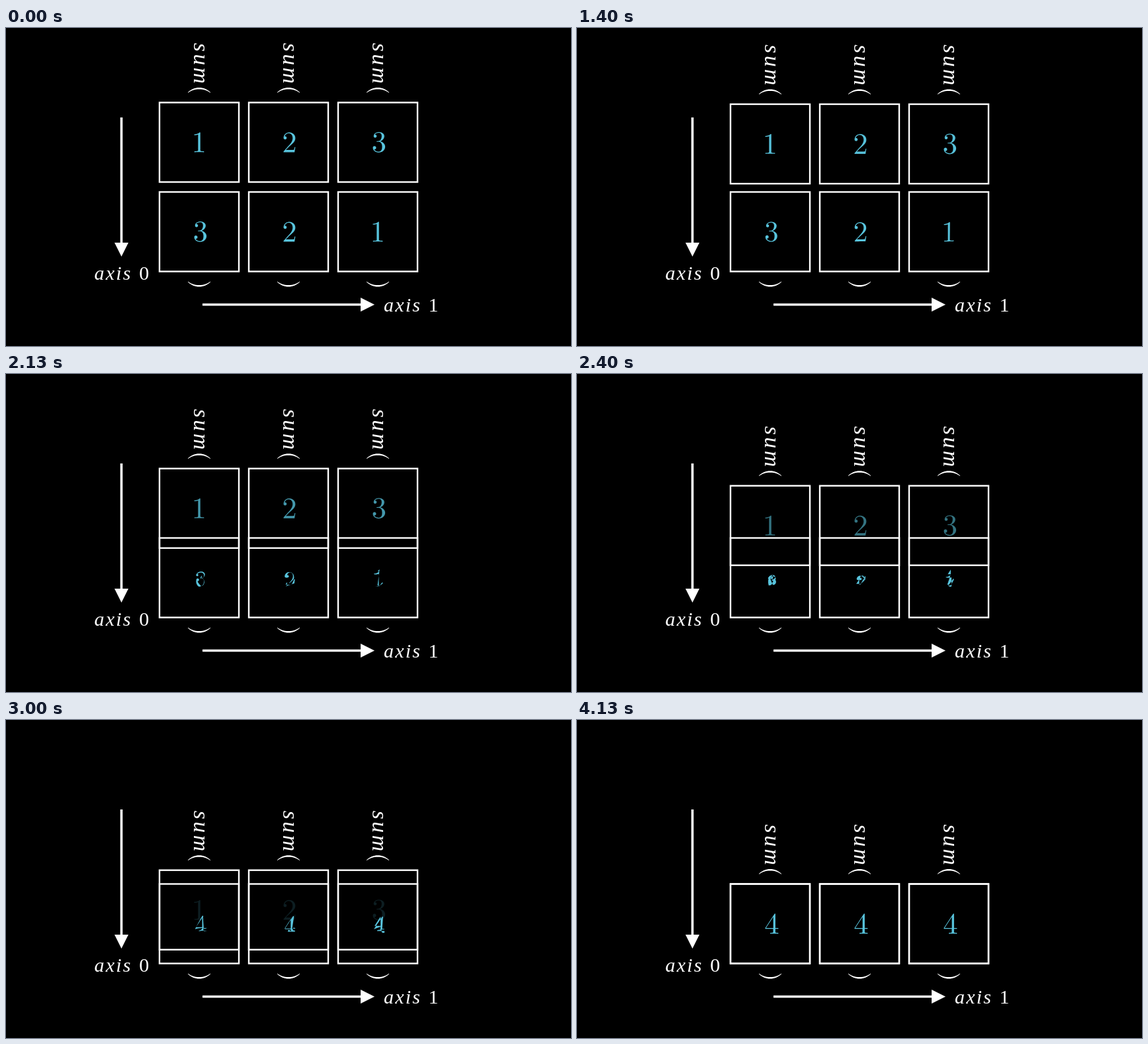
An HTML page for the animation above (4.99 s loop, 854 by 480 pixels).

```html
<!DOCTYPE html>
<html lang="en">
<head>
<meta charset="utf-8">
<title>Sum along axis 0</title>
<style>
  html, body { margin: 0; height: 100%; overflow: hidden; background: #000; }
  svg { display: block; width: 100%; height: 100%; }
  text { fill: #fff; font-family: "Liberation Serif", "Times New Roman", serif; }
  .word { font-style: italic; }
  .axis { font-size: 30px; }
  .axis.word { letter-spacing: 2.2px; }
  .sum { font-size: 34px; letter-spacing: 3.4px; }
  .box { fill: none; stroke: #fff; stroke-width: 2.4; }
  .digit { fill: #58c4dd; }
  .white { fill: #fff; }
  .shaft { stroke: #fff; stroke-width: 3.6; }
</style>
</head>
<body>
<svg viewBox="0 0 854 480" role="img" aria-label="A 2 by 3 array summed along axis 0">
  <defs>
    <path id="paren" d="M-16.9 7C-12 2.2-6.5 0 0 0S12 2.2 16.9 7V8C13 4.5 7 2.5 0 2.5S-13 4.5-16.9 8Z"/>
  </defs>
  <g id="bottom"></g>
  <g id="top"></g>

  <path class="shaft" d="M174.5 135V325M297 417.5H537"/>
  <path class="white" d="M164 324H185L174.5 345ZM536 407V428L557 417.5Z"/>
  <text class="axis word" x="133.5" y="380.3">axis</text>
  <text class="axis" x="208.7" y="380.3" text-anchor="middle">0</text>
  <text class="axis word" x="571" y="428">axis</text>
  <text class="axis" x="646" y="428" text-anchor="middle">1</text>
</svg>

<script>
const LOOP = 4990, FPS = 15, START = 1, DURATION = 3;   // ms, 1/s, s, s
const PITCH = 135, ROW_Y = 172.5, DIGIT_X = 284.5, DIGIT_SCALE = 0.045;
const STEPS = 6;                                        // samples per curve

// Digit outlines, 996 units per em, y downwards.
const DIGITS = {
  1: `M294-638C294-662 294-664 270-664C208-600 120-600 89-600L89-569
      C109-569 167-569 219-595L219-78C219-42 216-31 127-31L95-31L95 0
      C130-3 216-3 256-3C295-3 383-3 417 0L417-31L386-31C295-31 294-42 294-78Z`,
  2: `M127-77L233-180C388-317 447-370 447-470C447-584 358-664 236-664
      C123-664 50-572 50-483C50-428 100-428 103-428C120-428 155-439 155-481
      C155-506 136-533 102-533C94-533 92-533 89-531C111-597 166-633 223-633
      C314-633 356-552 356-470C356-391 308-313 252-250L61-38C50-27 50-23 50 0
      L420 0L447-173L423-173C417-144 411-100 400-84C394-77 328-77 306-77Z`,
  3: `M289-352C370-378 428-447 428-527C428-608 341-664 245-664
      C145-664 69-605 69-528C69-495 91-477 120-477C150-477 170-498 170-528
      C170-577 123-577 109-577C139-627 205-639 241-639C283-639 338-617 338-528
      C338-516 334-458 309-414C280-366 245-363 220-363C213-361 189-359 181-359
      C173-358 167-356 167-347C167-336 173-336 191-336L234-336
      C316-336 353-269 353-170C353-34 284-6 241-6C197-6 122-23 88-81
      C122-77 153-98 153-136C153-172 127-192 98-192C73-192 42-178 42-134
      C42-44 134 22 244 22C366 22 456-69 456-170C456-252 392-330 289-352Z`,
  4: `M294-164L294-78C294-42 291-31 217-31L197-31L197 0C238-3 289-3 331-3
      C373-3 425-3 467 0L467-31L445-31C372-31 370-42 370-78L370-164L469-164
      L469-195L370-195L370-648C370-669 370-675 353-675C345-675 342-675 334-662
      L28-195L28-164ZM298-195L56-195L298-567Z`
};

const mix = (a, b, u) => a + (b - a) * u;
const mixPoint = (p, q, u) => [mix(p[0], q[0], u), mix(p[1], q[1], u)];
const line = (p, q) => [p, mixPoint(p, q, 1 / 3), mixPoint(p, q, 2 / 3), q];

function bezier(points, u) {
  while (points.length > 1) {
    points = points.slice(1).map((q, i) => mixPoint(points[i], q, u));
  }
  return points[0];
}

// Outline text to a list of subpaths, each a list of cubic curves.
function parse(outline) {
  const subpaths = [];
  let pen, first;
  for (const [, command, args] of outline.matchAll(/([MLCZ])([^MLCZ]*)/g)) {
    const n = (args.match(/-?\d+/g) || []).map(Number);
    const points = n.flatMap((x, i) => i % 2 ? [] : [[x, n[i + 1]]]);
    const curves = subpaths[subpaths.length - 1];
    if (command === 'M') {
      first = points[0];
      subpaths.push([]);
    } else if (command === 'L') {
      curves.push(line(pen, points[0]));
    } else if (command === 'C') {
      curves.push([pen, ...points]);
    } else if (pen[0] !== first[0] || pen[1] !== first[1]) {
      curves.push(line(pen, first));
    }
    pen = points.length ? points[points.length - 1] : first;
  }
  return subpaths;
}

// Splits the curves evenly into `count` pieces and samples each piece.
function sample(curves, count) {
  const n = curves.length;
  const firstPiece = i => Math.ceil(i * count / n);
  return Array.from({ length: count * STEPS }, (_, s) => {
    const piece = Math.floor(s / STEPS), i = Math.floor(piece * n / count);
    const local = piece - firstPiece(i) + (s % STEPS) / STEPS;
    return bezier(curves[i], local / (firstPiece(i + 1) - firstPiece(i)));
  });
}

// Puts the left edge and the vertical middle of the shape in place.
function place(subpaths, x, y) {
  const xs = subpaths.flat().map(p => p[0]), ys = subpaths.flat().map(p => p[1]);
  const left = Math.min(...xs), middle = (Math.min(...ys) + Math.max(...ys)) / 2;
  return subpaths.map(points => points.map(p =>
    [x + (p[0] - left) * DIGIT_SCALE, y + (p[1] - middle) * DIGIT_SCALE]));
}

const toPath = subpaths => subpaths.map(points =>
  'M' + points.map(p => p[0].toFixed(2) + ' ' + p[1].toFixed(2)).join('L') + 'Z').join('');

function makeMorph(from, to, x, y) {
  const a = parse(DIGITS[from]), b = parse(DIGITS[to]);
  const end = a[a.length - 1].slice(-1)[0][3];
  while (a.length < b.length) a.push([[end, end, end, end]]);
  const counts = a.map((curves, i) => Math.max(curves.length, b[i].length));
  const [start, goal] = [a, b].map(shape =>
    place(shape.map((curves, i) => sample(curves, counts[i])), x, y));
  return u => toPath(start.map((points, i) =>
    points.map((p, j) => mixPoint(p, goal[i][j], u))));
}

function add(parent, tag, attributes, text = '') {
  const node = document.createElementNS(parent.namespaceURI, tag);
  for (const name in attributes) node.setAttribute(name, attributes[name]);
  node.textContent = text;
  return parent.appendChild(node);
}

const top_ = document.getElementById('top');
const bottom = document.getElementById('bottom');
const fading = [], morphing = [];

[[1, 3], [2, 2], [3, 1]].forEach(([upper, lower], column) => {
  const shift = column * PITCH, x = 232 + shift, center = x + 60;
  const addBox = (parent, y) =>
    add(parent, 'rect', { class: 'box', x, y: y - 60, width: 120, height: 120 });

  addBox(top_, ROW_Y);
  add(top_, 'use', { href: '#paren', class: 'white', transform: `translate(${center} 90)` });
  add(top_, 'text', { class: 'sum word', transform: `translate(${283.5 + shift} 22.5) rotate(90)` }, 'sum');
  const still = place(parse(DIGITS[upper]).map(c => sample(c, c.length)), DIGIT_X + shift, ROW_Y);
  fading.push(add(top_, 'path', { class: 'digit', d: toPath(still) }));

  addBox(bottom, ROW_Y + PITCH);
  add(bottom, 'use', { href: '#paren', class: 'white', transform: `translate(${center} 390.5) rotate(180)` });
  morphing.push({
    node: add(bottom, 'path', { class: 'digit' }),
    shape: makeMorph(lower, 4, DIGIT_X + shift, ROW_Y + PITCH)
  });
});

const sigmoid = x => 1 / (1 + Math.exp(-x));

function smooth(u) {
  const tail = sigmoid(-5);
  return (sigmoid(10 * (u - 0.5)) - tail) / (1 - 2 * tail);
}

const origin = performance.now();
let shown = -1;

function draw() {
  const time = (performance.now() - origin) % LOOP;
  const tick = Math.floor((time + 4) * FPS / 1000);
  if (tick !== shown) {
    shown = tick;
    const u = smooth(Math.min(1, Math.max(0, (tick / FPS - START) / DURATION)));
    top_.setAttribute('transform', `translate(0 ${u * PITCH})`);
    fading.forEach(node => node.setAttribute('opacity', 1 - u));
    morphing.forEach(({ node, shape }) => node.setAttribute('d', shape(u)));
  }
  requestAnimationFrame(draw);
}
draw();
</script>
</body>
</html>
```
